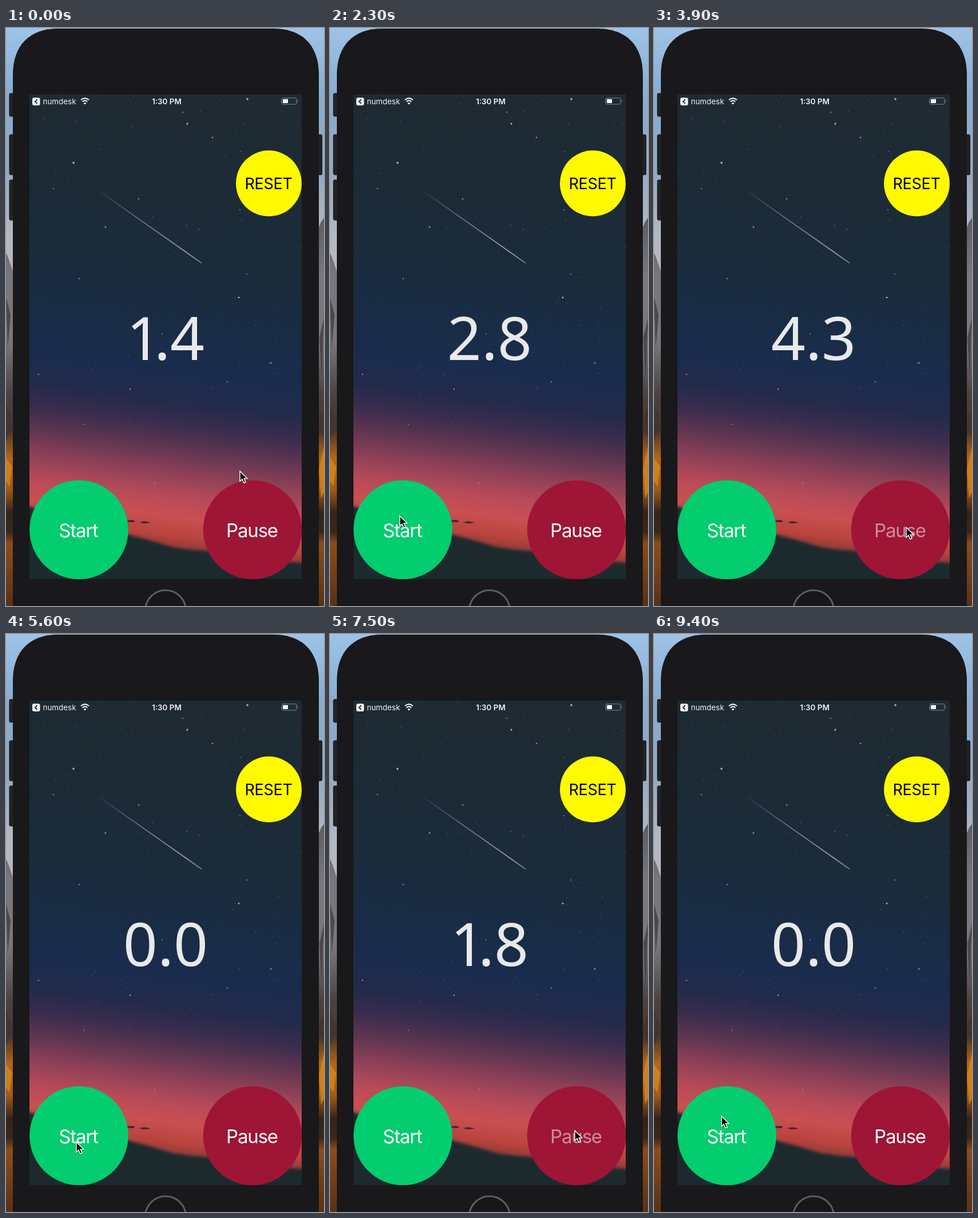
An HTML page for the animation above (9500 ms loop, 556x1008 px).

```html
<!DOCTYPE html>
<html lang="en">
<head>
<meta charset="utf-8">
<title>Stopwatch</title>
<style>
  html, body { margin: 0; width: 100%; height: 100%; overflow: hidden; background: #19181a; }
  svg { display: block; width: 100%; height: 100%; }
  text { font-family: Inter, "Open Sans", sans-serif; }
  .label { font-size: 33px; letter-spacing: -1.2px; text-anchor: middle; fill: #fff; }
  .status { font-size: 13.4px; fill: #f2f2f3; }
  #time { font-family: "Noto Sans", "Open Sans", sans-serif; font-size: 105px; text-anchor: middle; fill: #e9e9ea; }
</style>
</head>
<body>
<svg viewBox="0 0 556 1008">
  <defs>
    <linearGradient id="desk" x1="0" y1="0" x2="0" y2="1">
      <stop offset="0" stop-color="#9fc3e6"/>
      <stop offset=".12" stop-color="#88abd0"/>
      <stop offset=".25" stop-color="#93aac4"/>
      <stop offset=".36" stop-color="#b4b8c2"/>
      <stop offset=".42" stop-color="#b9b6bb"/>
    </linearGradient>
    <linearGradient id="land" x1="0" y1="330" x2="0" y2="1008" gradientUnits="userSpaceOnUse">
      <stop offset="0" stop-color="#5d5c63"/>
      <stop offset=".15" stop-color="#77777d"/>
      <stop offset=".32" stop-color="#77777c"/>
      <stop offset=".46" stop-color="#4a4140"/>
      <stop offset=".55" stop-color="#4d3527"/>
      <stop offset=".62" stop-color="#b4661c"/>
      <stop offset=".7" stop-color="#a35a17"/>
      <stop offset=".76" stop-color="#33241b"/>
      <stop offset=".81" stop-color="#3a2819"/>
      <stop offset=".84" stop-color="#8c4c1c"/>
      <stop offset="1" stop-color="#573118"/>
    </linearGradient>
    <linearGradient id="sky" x1="279" y1="116" x2="174" y2="948" gradientUnits="userSpaceOnUse">
      <stop offset="0" stop-color="#1f2a32"/>
      <stop offset=".2" stop-color="#1c2b36"/>
      <stop offset=".36" stop-color="#1a2b3b"/>
      <stop offset=".48" stop-color="#192c46"/>
      <stop offset=".57" stop-color="#1a2c4e"/>
      <stop offset=".63" stop-color="#232a4c"/>
      <stop offset=".68" stop-color="#3a2d4d"/>
      <stop offset=".73" stop-color="#623651"/>
      <stop offset=".78" stop-color="#8f4158"/>
      <stop offset=".83" stop-color="#b94b59"/>
      <stop offset=".87" stop-color="#c94f51"/>
      <stop offset=".91" stop-color="#b8433c"/>
      <stop offset=".95" stop-color="#6f3536"/>
      <stop offset="1" stop-color="#2c2c33"/>
    </linearGradient>
    <linearGradient id="trail" x1="158" y1="281" x2="342" y2="410" gradientUnits="userSpaceOnUse">
      <stop offset="0" stop-color="#8d86a4" stop-opacity="0"/>
      <stop offset=".4" stop-color="#8d86a4" stop-opacity=".75"/>
      <stop offset=".85" stop-color="#a79cb9"/>
      <stop offset="1" stop-color="#7d7690"/>
    </linearGradient>
    <clipPath id="screen"><path d="M41 116H517V961H41Z"/></clipPath>
    <filter id="soft" x="-10%" y="-30%" width="120%" height="160%"><feGaussianBlur stdDeviation="2.5"/></filter>
    <filter id="shade" x="-50%" y="-50%" width="200%" height="200%">
      <feDropShadow dx="0" dy="1" stdDeviation="1" flood-opacity=".4"/>
    </filter>
  </defs>

  <rect width="556" height="1008" fill="url(#desk)"/>
  <path d="M0 392L5 404 13 428V1008H0Z M556 331L551 338 545 352V1008H556Z" fill="url(#land)"/>
  <path d="M0 470L8 500 3 560Z M556 505L548 540 552 610Z M0 655L12 690 0 720Z M556 660L547 690 556 715Z" fill="#3c3434" opacity=".7"/>
  <path d="M0 750L11 765 6 800 0 790Z M556 730L547 770 551 820 556 810Z" fill="#d98a18" opacity=".75"/>

  <g fill="#222225" stroke="#111113">
    <rect x="6" y="114" width="10" height="40" rx="2"/>
    <rect x="6" y="186" width="10" height="70" rx="2"/>
    <rect x="6" y="265" width="10" height="70" rx="2"/>
    <rect x="543" y="186" width="9.5" height="70" rx="2"/>
  </g>
  <path d="M12 1010V82C12 30 41 1 92 1H467C518 1 547 30 547 82V1010Z" fill="#19181a"/>
  <circle cx="279" cy="1016" r="35.5" fill="#171618" stroke="#5d5d60" stroke-width="3"/>

  <g clip-path="url(#screen)">
    <rect x="41" y="116" width="476" height="845" fill="url(#sky)"/>
    <g id="stars"/>
    <path d="M158 281L342 410" stroke="url(#trail)" stroke-width="1.7" fill="none"/>
    <path d="M30 832C80 842 110 866 165 872 220 884 250 893 290 905 330 913 370 910 420 924L530 934V980H30Z" fill="#1f292f" filter="url(#soft)"/>
    <path d="M209 861Q217 855 226 860L222 862Z M233 862Q243 858 253 863L241 864Z" fill="#42272e"/>
  </g>

  <rect x="46" y="121.500" width="13.500" height="13.500" rx="3" fill="#f4f4f5"/>
  <path d="M54.500 124.800L50.800 128.300 54.500 131.800" fill="none" stroke="#1f2a32" stroke-width="1.900"/>
  <text class="status" x="64.500" y="133">numdesk</text>
  <g fill="none" stroke="#f4f4f5" stroke-width="2">
    <path d="M131 125.600Q138 119.200 145 125.600M133.600 128.600Q138 124.400 142.400 128.600"/>
    <path d="M138 133.600L135.500 131Q138 128.800 140.500 131Z" fill="#f4f4f5" stroke="none"/>
  </g>
  <text class="status" x="281" y="133" text-anchor="middle" font-weight="600">1:30 PM</text>
  <rect x="482" y="122" width="26" height="11" rx="2.500" fill="none" stroke="#828990"/>
  <path d="M509.500 125.500Q511.500 127.500 509.500 129.500Z" fill="#828990"/>
  <rect x="484" y="124" width="9" height="7" rx="1" fill="#fff"/>

  <text id="time" x="279" y="579"></text>

  <circle cx="459.500" cy="271" r="57.500" fill="#fffa00"/>
  <text id="reset" x="459" y="281" font-size="27" text-anchor="middle" letter-spacing="-.3">RESET</text>
  <circle cx="127.500" cy="875" r="86.300" fill="#03cd6e"/>
  <text id="start" class="label" x="126.500" y="887.500">Start</text>
  <circle cx="431" cy="875" r="86.300" fill="#9e1536"/>
  <text id="pause" class="label" x="430" y="887.500">Pause</text>

  <path id="cursor" d="M0 0V17.500L4 13.800 7 20.500 10 19.200 7.100 12.600H12.600Z"
    fill="#000" stroke="#fff" stroke-width="1.400" filter="url(#shade)"/>
</svg>

<script>
const $ = id => document.getElementById(id);
const LOOP = 9500, STEP = 100;

// ms, x, y of the pointer tip; pauses repeat a position
const path = [
  [0, 409, 773], [400, 428, 868], [1500, 428, 868],
  [2200, 122, 851], [2600, 122, 851],
  [3500, 441, 871], [4000, 441, 871],
  [4600, 458, 293], [4900, 458, 293],
  [5500, 123, 886], [5800, 123, 886],
  [6700, 385, 841], [7000, 428, 866], [7700, 428, 866],
  [8200, 458, 293], [8500, 458, 293],
  [9300, 118, 841], [9500, 118, 841]
];

const presses = [
  ['pause', 1300, 1400], ['start', 2400, 2500], ['pause', 3900, 4000],
  ['reset', 4800, 4900], ['start', 5700, 5800], ['pause', 7500, 7600],
  ['reset', 8400, 8500]
];

// from ms, tenths shown, running
const runs = [
  [0, 14, 1], [1400, 28, 0], [2400, 28, 1], [3900, 43, 0],
  [4900, 0, 0], [5700, 0, 1], [7600, 19, 0], [8500, 0, 0]
];

function pointer(t) {
  const i = Math.max(1, path.findIndex(p => p[0] >= t));
  const [t0, x0, y0] = path[i - 1], [t1, x1, y1] = path[i];
  const u = (t - t0) / (t1 - t0), k = u * u * (3 - 2 * u);
  return [x0 + (x1 - x0) * k, y0 + (y1 - y0) * k];
}

function reading(t) {
  const [from, base, on] = runs.filter(r => r[0] <= t).pop();
  return ((base + on * (t - from) / 100) / 10).toFixed(1);
}

function drawStars() {
  let seed = 71;
  const rnd = () => (seed = seed * 16807 % 2147483647) / 2147483647;
  const dot = (x, y, r, o, c = '#b9adc4') =>
    `<circle cx="${x}" cy="${y}" r="${r}" fill="${c}" opacity="${o}"/>`;
  let out = '';
  for (let i = 0; i < 150; i++) {
    out += dot(41 + rnd() * 476, 118 + rnd() * 580, .4 + rnd() * .5, .2 + rnd() * .4);
  }
  const main = [
    [118, 235, 2.2], [317, 167, 1.9], [422, 124, 2.2], [361, 191, 1.4], [407, 470, 1.8],
    [174, 347, 1.6], [463, 584, 1.6], [217, 630, 1.4], [57, 604, 1.3], [309, 147, 1.2],
    [128, 437, 1.2], [232, 298, 1.3], [409, 317, 1.1], [83, 280, 1.2], [421, 429, 1.1],
    [387, 617, 1.2], [137, 691, 1], [260, 794, 1], [273, 533, 1]
  ];
  for (const [x, y, r] of main) {
    out += dot(x, y, r, .65, '#a184b4') + dot(x, y, r * .5, .9, '#e6d8ea');
  }
  $('stars').innerHTML = out;
}

let shown = '';
function render(ms) {
  const t = Math.floor(ms % LOOP / STEP) * STEP;
  const value = reading(t);
  if (value !== shown) {
    shown = value;
    // the digit one sits tighter than the others
    $('time').innerHTML = value.replace(/1/g, '<tspan letter-spacing="-12">1</tspan>');
  }
  for (const id of ['start', 'pause', 'reset']) {
    const down = presses.some(([b, a, z]) => b === id && t >= a && t < z);
    $(id).setAttribute('opacity', down ? .5 : 1);
  }
  $('cursor').setAttribute('transform', `translate(${pointer(t)})`);
}

drawStars();
render(0);
const began = performance.now();
(function tick() {
  render(performance.now() - began);
  requestAnimationFrame(tick);
})();
</script>
</body>
</html>
```
